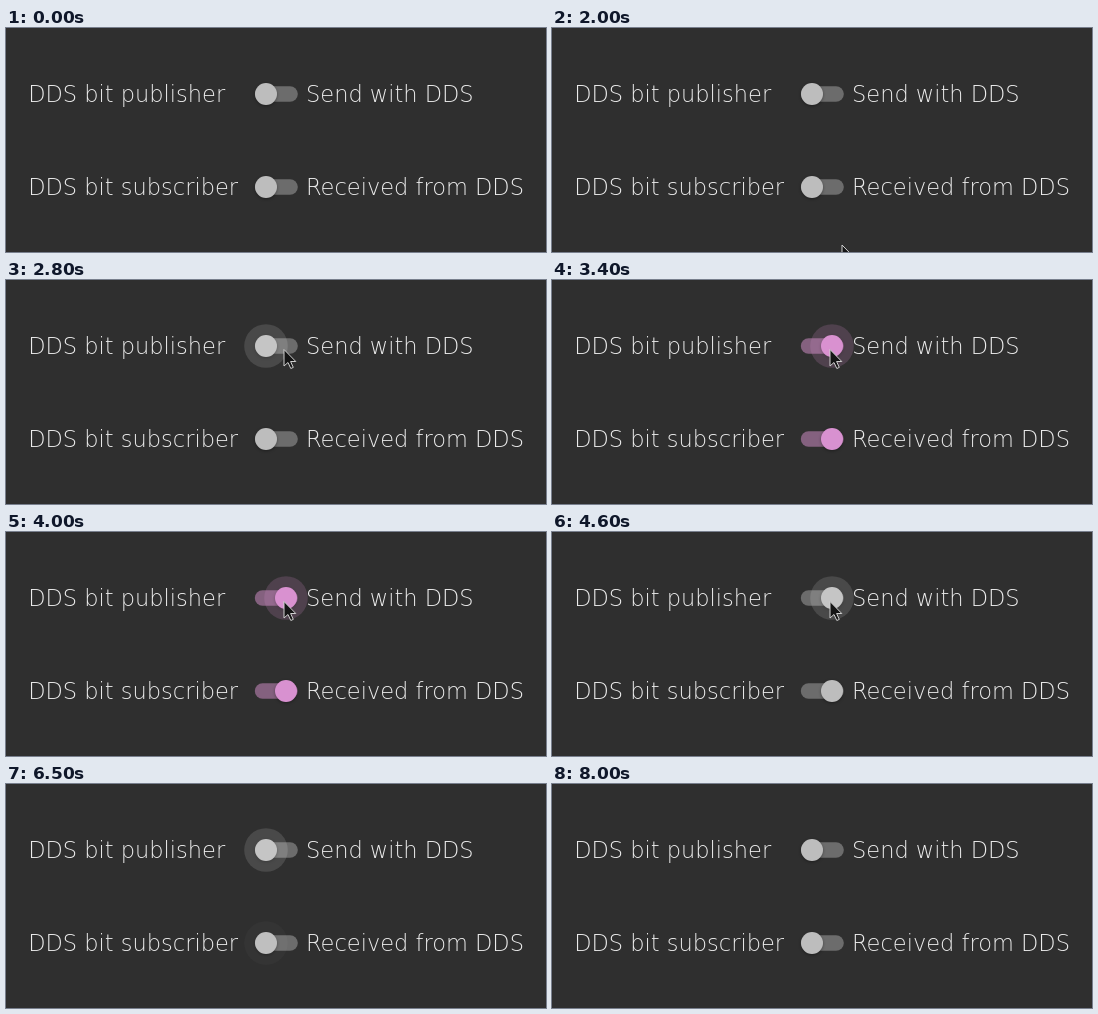
Animation of 540x224 px, one loop 8200 ms. Source, as an HTML page:

```html
<!DOCTYPE html>
<html lang="en">
<head>
<meta charset="utf-8">
<title>Linked switches</title>
<style>
  html, body { margin: 0; width: 100%; height: 100%; overflow: hidden; background: #2f2f2f; }
  svg { display: block; filter: blur(.45px); }
  text { font: 200 22.5px "DejaVu Sans", sans-serif; fill: #ececec; }
  .knob { filter: drop-shadow(0 1px 1.5px rgba(0, 0, 0, .35)); }
</style>
</head>
<body>
<svg id="stage" width="540" height="224" viewBox="0 0 540 224"></svg>
<script>
const LOOP = 8200, STEP = 100;
const ENTER = 2000, TURN_ON = 3300, PRESS = 4300, TURN_OFF = 4600, LEAVE = 6500;
const OFF = { knob: '#bdbdbd', track: '#6c6c6c', ripple: '#fff', strength: .125 };
const ON = { knob: '#d891d0', track: '#84617f', ripple: '#d891d0', strength: .19 };
const stage = document.getElementById('stage');

function set(node, attrs) {
  for (const name in attrs) node.setAttribute(name, attrs[name]);
}

function add(tag, attrs, label = '') {
  const node = document.createElementNS('http://www.w3.org/2000/svg', tag);
  set(node, attrs);
  node.textContent = label;
  return stage.appendChild(node);
}

// Progress from 0 to 1, a smooth version of it, and a rise and fall.
const ramp = (t, start, length) => Math.min(1, Math.max(0, (t - start) / length));
const smooth = u => u * u * (3 - 2 * u);
const pulse = (t, start, length) => Math.sin(Math.PI * ramp(t, start, length));

function makeRow(y, left, right, glow) {
  add('text', { x: 22.2, y: y + 8 }, left);
  add('text', { x: 300, y: y + 8 }, right);
  return {
    glow,
    track: add('rect', { x: 248.8, y: y - 7.8, width: 43, height: 15.6, rx: 7.8 }),
    knob: add('circle', { class: 'knob', cy: y, r: 11 }),
    ripple: add('circle', { cy: y, r: 21.8 })
  };
}

const hoverGlow = t => ramp(t, 2400, 400) - ramp(t, LEAVE, 300)
  + .5 * (pulse(t, TURN_ON + STEP, 600) + pulse(t, PRESS, TURN_OFF - PRESS));
const passingGlow = t => .4 * pulse(t, LEAVE - STEP, 500);

const rows = [
  makeRow(66, 'DDS bit publisher', 'Send with DDS', hoverGlow),
  makeRow(159, 'DDS bit subscriber', 'Received from DDS', passingGlow)
];
const cursor = add('path', {
  d: 'M0 0V16.5L4 13L6.8 19L9.3 17.9L6.6 12H11.8Z',
  fill: '#151515', stroke: '#d0d0d0', 'stroke-width': 1
});

function draw(t) {
  const look = t >= TURN_ON && t < TURN_OFF ? ON : OFF;
  const x = 260 + 20 * (ramp(t, TURN_ON - 50, 150) - ramp(t, TURN_OFF, 200));
  for (const { track, knob, ripple, glow } of rows) {
    set(track, { fill: look.track });
    set(knob, { cx: x, fill: look.knob });
    set(ripple, { cx: x, fill: look.ripple, opacity: Math.max(0, glow(t)) * look.strength });
  }
  const travel = smooth(ramp(t, ENTER, 600));
  set(cursor, {
    transform: `translate(${290 - 12 * travel} ${217 - 147.5 * travel})`,
    visibility: t >= ENTER && t < LEAVE ? 'visible' : 'hidden'
  });
}

const start = performance.now();
function tick() {
  const t = (performance.now() - start) % LOOP;
  draw(Math.floor(t / STEP) * STEP);
  requestAnimationFrame(tick);
}
tick();
</script>
</body>
</html>
```
